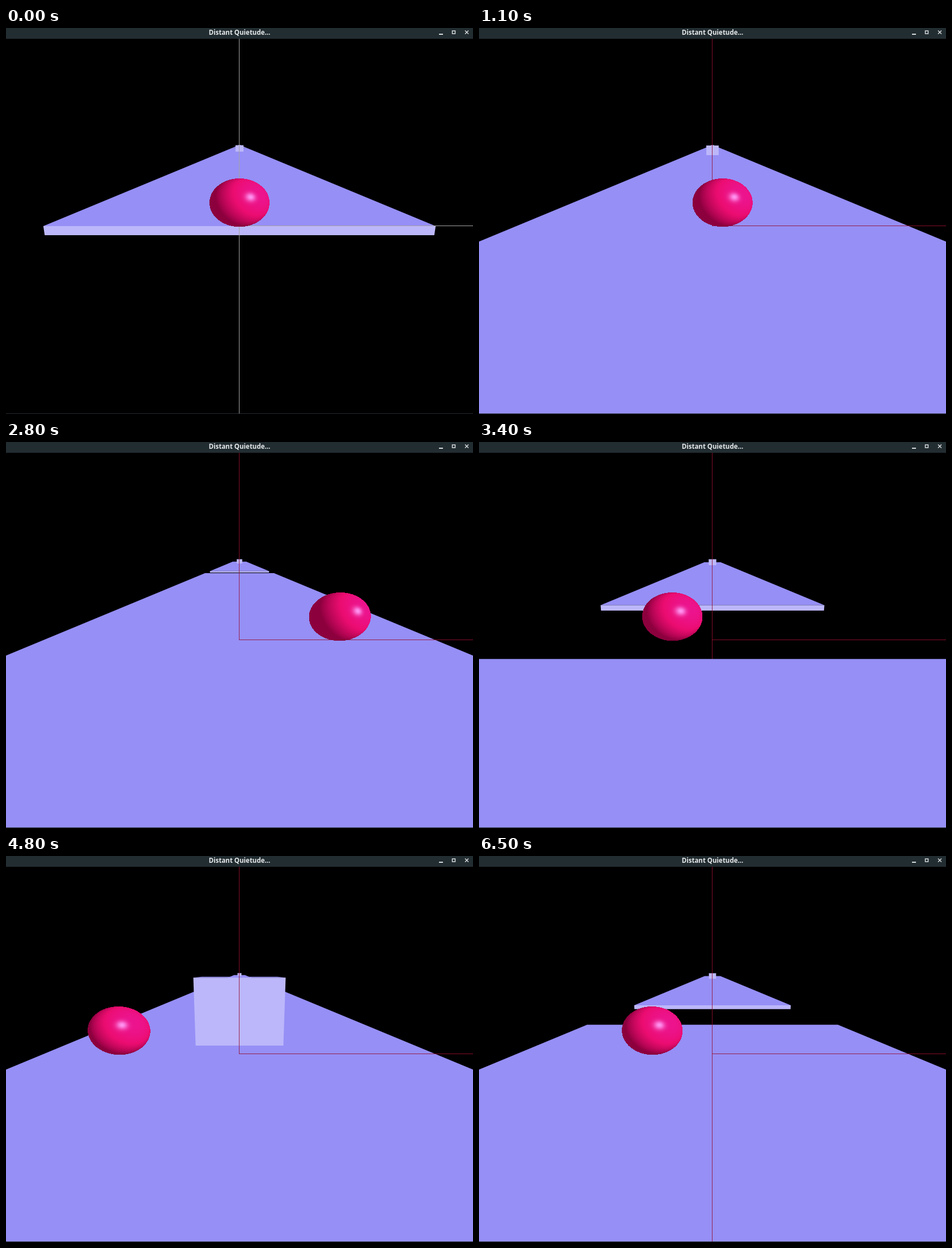
These frames come from a looping animation (824x680 px, 8 s). An HTML page with a canvas:

```html
<!DOCTYPE html>
<html lang="en">
<head>
<meta charset="utf-8">
<title>Distant Quietude...</title>
<style>
  html, body { margin: 0; width: 100%; height: 100%; overflow: hidden; background: #000; }
  canvas { display: block; }
</style>
</head>
<body>
<canvas id="stage" width="824" height="680"></canvas>
<script>
const ctx = document.getElementById('stage').getContext('2d');
const LOOP = 8000, STEP = 100;

// Camera at (0, 1, 4) looking at the world origin, 60 degree field of view.
const CAM = Math.hypot(1, 4), COS = 4 / CAM, SIN = 1 / CAM, FOCAL = Math.sqrt(3);
const CX = 412, CY = 349, SX = 412, SY = 330.5, NEAR = 1;
const TOP = '#968ff6', FRONT = '#bcb7fa', BAR = '#222d32';

const PERIOD = 100, LENGTH = 96, HALF_WIDTH = 2, THICKNESS = 0.12;
const BLOCK = { half: 0.5, height: 0.938 };
const RADIUS = 0.3;

const dot = (a, b) => a[0] * b[0] + a[1] * b[1] + a[2] * b[2];
const unit = v => v.map(c => c / Math.hypot(...v));
// Directional light and its highlight direction, in camera space.
const LIGHT = unit([0.9, 0.4, 1]);
const HALFWAY = unit([LIGHT[0], LIGHT[1], LIGHT[2] + 1]);

// [time, value] pairs, joined by straight lines.
const TRAVEL = [[500, 0], [600, 1], [1100, 18], [2000, 48.41], [3400, 96.8],
  [4400, 132.7], [4500, 132.7], [4600, 139.8], [4800, 147], [4900, 150.49],
  [5400, 166.5], [6100, 190.2], [6400, 190.2], [6500, 193.6]];
const BALL_X = [[1000, 0], [1100, 0.1], [1600, 0.1], [2000, 1.1], [2200, 1.1], [2300, 1],
  [2840, 1], [3640, -1], [4500, -1], [4700, -1.2], [5300, -1.2], [5400, -1.1],
  [5900, -1.1], [6100, -0.8], [6400, -0.8], [6500, -0.6]];
// Times at which the axis lying in the floor plane appears or vanishes.
const AXIS_FLIPS = [600, 1600, 2700, 5100, 5900, 6500];

function valueAt(keys, t) {
  const next = keys.findIndex(k => k[0] > t);
  if (next === 0) return keys[0][1];
  if (next < 0) return keys[keys.length - 1][1];
  const [t0, a] = keys[next - 1], [t1, b] = keys[next];
  return a + (b - a) * (t - t0) / (t1 - t0);
}

const depth = (y, z) => CAM - z * COS - y * SIN;
const nearZ = y => (CAM - NEAR - y * SIN) / COS;

function project(x, y, z) {
  const k = FOCAL / depth(y, z);
  return [CX + x * k * SX, CY - (y * COS - z * SIN) * k * SY];
}

// Symmetric quad between two (y, z) edges of the given half width.
function quad(color, half, y0, z0, y1, z1) {
  const corners = [[-half, y0, z0], [half, y0, z0], [half, y1, z1], [-half, y1, z1]];
  ctx.fillStyle = color;
  ctx.beginPath();
  corners.forEach(c => ctx.lineTo(...project(...c)));
  ctx.fill();
}

// Top and front faces of a box, cut at the near plane.
function box(half, yTop, yBottom, zFront, zBack) {
  const zCut = Math.min(zFront, nearZ(yTop));
  if (zCut > zBack) quad(TOP, half, yTop, zBack, yTop, zCut);
  const yCut = Math.min(yTop, (CAM - NEAR - zFront * COS) / SIN);
  if (yCut > yBottom) quad(FRONT, half, yCut, zFront, yBottom, zFront);
}

function rect(color, x, y, w, h) {
  ctx.fillStyle = color;
  ctx.fillRect(x, y, w, h);
}

function ballColor(normal) {
  const diffuse = Math.max(0, dot(normal, LIGHT));
  const shine = Math.max(0, dot(normal, HALFWAY)) ** 70;
  const r = Math.min(236, 140 + 150 * diffuse) + 19 * shine;
  const g = 20 * diffuse + 130 * shine;
  const b = 62 + 80 * diffuse + 105 * shine;
  return `rgb(${r | 0},${g | 0},${b | 0})`;
}

// Casts one ray per pixel at a sphere resting on the floor.
function drawBall(x) {
  const center = [x, RADIUS * COS, -depth(RADIUS, 0)];
  const [cx, cy] = project(x, RADIUS, 0).map(Math.round);
  for (let py = cy - 50; py <= cy + 50; py++) {
    for (let px = cx - 65; px <= cx + 65; px++) {
      const ray = unit([(px + 0.5 - CX) / SX, (CY - py - 0.5) / SY, -FOCAL]);
      const along = dot(ray, center);
      const inside = RADIUS ** 2 - dot(center, center) + along ** 2;
      if (inside < 0) continue;
      const distance = along - Math.sqrt(inside);
      const normal = ray.map((c, i) => (c * distance - center[i]) / RADIUS);
      rect(ballColor(normal), px, py, 1, 1);
    }
  }
}

function drawWindowFrame() {
  rect(BAR, 0, 0, 824, 19);
  rect(BAR, 0, 679, 824, 1);
  ctx.fillStyle = '#e6e9ea';
  ctx.font = 'bold 11.5px "Noto Sans", "Open Sans", sans-serif';
  ctx.textAlign = 'center';
  ctx.fillText('Distant Quietude...', CX, 11.5);
  rect('#d5d9da', 764, 10, 7, 2);
  ctx.strokeStyle = '#d5d9da';
  ctx.lineWidth = 1.5;
  ctx.strokeRect(787.5, 5, 5, 5);
  ctx.beginPath();
  ctx.moveTo(810, 4.5); ctx.lineTo(816, 10.5);
  ctx.moveTo(816, 4.5); ctx.lineTo(810, 10.5);
  ctx.stroke();
}

function draw(t) {
  const travel = valueAt(TRAVEL, t);
  const ballX = Math.round(valueAt(BALL_X, t) * 10) / 10;
  const axisColor = t < 600 ? '#a3a3a3' : 'rgba(150,14,48,0.86)';
  const floorAxisOnTop = AXIS_FLIPS.filter(f => f <= t).length % 2 === 0;
  const floorAxis = () => rect(axisColor, 411, 349, 1, 331);

  rect('#000', 0, 0, 824, 680);
  if (!floorAxisOnTop) floorAxis();

  // Far platform first; a block that has passed the axes is drawn over them.
  const first = Math.floor(travel / PERIOD);
  const nearBlocks = [];
  for (const i of [first + 1, first]) {
    const z = travel - i * PERIOD, middle = z - LENGTH / 2;
    const front = middle + BLOCK.half, back = middle - BLOCK.half;
    const drawBlock = () => box(BLOCK.half, BLOCK.height, 0, front, back);
    box(HALF_WIDTH, 0, -THICKNESS, z, z - LENGTH);
    if (front > 0) nearBlocks.push(drawBlock);
    else drawBlock();
  }

  rect(axisColor, 411, 19, 1, 330);
  rect(axisColor, 412, 348, 412, 1);
  if (floorAxisOnTop) floorAxis();
  nearBlocks.forEach(drawBlock => drawBlock());
  drawBall(ballX);
  drawWindowFrame();
}

let shown = -1;
function tick() {
  const t = Math.floor(performance.now() % LOOP / STEP) * STEP;
  if (t !== shown) draw(shown = t);
  requestAnimationFrame(tick);
}
tick();
</script>
</body>
</html>
```
